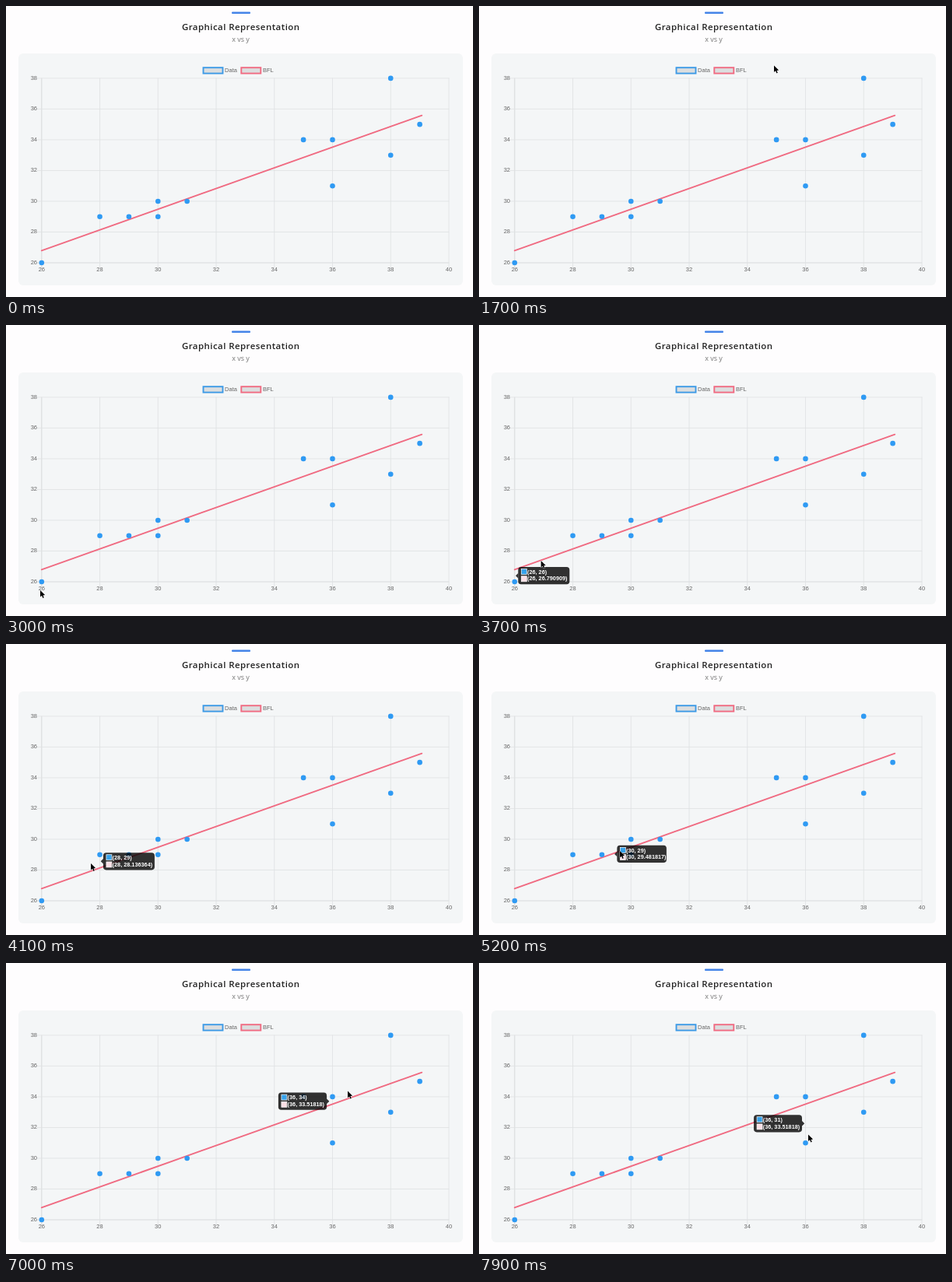
An HTML page for the animation above (8 s loop, 600 px wide and 374 px high).

```html
<!DOCTYPE html>
<html lang="en">
<head>
<meta charset="utf-8">
<title>Graphical Representation</title>
<style>
  html, body { margin: 0; width: 100%; height: 100%; overflow: hidden; background: #fefdfe; }
  svg { display: block; width: 600px; height: 374px; }
  text { font: 7.5px "Liberation Sans", Arial, sans-serif; fill: #666; }
  .title { font: 600 11.5px "Open Sans", "Noto Sans", sans-serif; letter-spacing: .43px; fill: #222; }
  .sub { font: 9px "Open Sans", "Noto Sans", sans-serif; fill: #777; }
  #tip text { font-size: 7.3px; font-weight: bold; fill: #fff; }
</style>
</head>
<body>
<svg viewBox="0 0 600 374">
  <rect x="290" y="7.5" width="24" height="2.4" rx="1" fill="#4484e8"/>
  <text class="title" x="301.7" y="31" text-anchor="middle">Graphical Representation</text>
  <text class="sub" x="301.5" y="46.3" text-anchor="middle">x vs y</text>
  <rect x="16" y="61" width="571" height="298" rx="6" fill="#f4f6f7"/>
  <g id="chart"></g>
  <g id="tip">
    <g fill="#000" fill-opacity=".8"><rect id="box" y="-11.1" height="22.2" rx="3.8"/><path id="caret"/></g>
    <g id="body">
      <rect x="4" y="-8.6" width="7" height="7" fill="#36a2eb" stroke="#fff" stroke-width=".7"/>
      <rect x="4" y=".6" width="7" height="7" fill="#fbdfe5" stroke="#fff" stroke-width=".7"/>
      <text id="row1" x="11.7" y="-2.4"></text>
      <text id="row2" x="11.7" y="6.2"></text>
    </g>
  </g>
  <path id="cursor" d="M0 0V8.6L2 6.8 3.4 9.9 4.8 9.3 3.5 6.4 6.1 6.1Z"
        fill="#000" stroke="#fff" stroke-width=".7" paint-order="stroke"/>
</svg>
<script>
const LOOP = 8000, STEP = 100, EASE_MS = 400, HOVER_LAG = 30;
const BLUE = '#2f9af3', PINK = '#f06b82';
const $ = id => document.getElementById(id);
const px = v => 45.8 + (v - 26) * 37.37;
const py = v => 330 - (v - 26) * 19.76;
const fit = v => 9.2999995 + v * 0.74 / 1.1;
const points = [[26, 26], [28, 29], [29, 29], [30, 29], [30, 30], [31, 30],
  [35, 34], [36, 34], [36, 31], [38, 33], [38, 38], [39, 35]];

function add(tag, attrs, text = '') {
  const el = document.createElementNS('http://www.w3.org/2000/svg', tag);
  for (const k in attrs) el.setAttribute(k, attrs[k]);
  el.textContent = text;
  $('chart').append(el);
}

function line(x1, y1, x2, y2, stroke, width) {
  add('line', { x1, y1, x2, y2, stroke, 'stroke-width': width, 'stroke-linecap': 'round' });
}

function legend(x, stroke, label) {
  add('rect', { x, y: 79.2, width: 25, height: 7.4, fill: '#dcdedf', stroke, 'stroke-width': 1.9 });
  add('text', { x: x + 27.6, y: 85.2 }, label);
}

function buildChart() {
  for (let v = 26; v <= 40; v += 2) {
    const grid = v === 26 ? '#d0d2d3' : '#dfe1e2';
    line(px(v), 92.9, px(v), 336, grid, 0.8);
    add('text', { x: px(v), y: 341.2, 'text-anchor': 'middle' }, v);
    if (v > 38) continue;
    line(40, py(v), 569, py(v), grid, 0.8);
    add('text', { x: 40, y: py(v) + 2, 'text-anchor': 'end' }, v);
  }
  legend(253.5, '#3d9ae6', 'Data');
  legend(302.3, PINK, 'BFL');
  line(px(26), py(fit(26)), px(39.07), py(fit(39.07)), PINK, 1.9);
  for (const [x, y] of points) add('circle', { cx: px(x), cy: py(y), r: 3.3, fill: BLUE });
}

// Pointer key positions: time, x, y
const path = [
  [1500, 590, 38], [1900, 168, 115], [2300, 71, 133], [2500, 8, 275], [2700, 8, 363],
  [3000, 44, 341], [3200, 43, 329], [4100, 109, 282], [4400, 109, 282], [4600, 66, 295],
  [4800, 140, 275], [5000, 155, 268], [5100, 155, 268], [5125, 181, 266], [5200, 181, 266],
  [6450, 205, 265], [6500, 221, 267], [6600, 375, 231], [7100, 455, 148], [7500, 424, 200],
  [7900, 423, 220.5]
];

const mix = (a, b, k) => a + (b - a) * k;
const easeOutQuart = k => 1 - (1 - Math.min(k, 1)) ** 4;

function pointerAt(t) {
  if (t < path[0][0]) return null;
  const i = path.findIndex(p => p[0] > t);
  if (i < 0) return path.at(-1).slice(1);
  const [a, b] = [path[i - 1], path[i]];
  const k = (t - a[0]) / (b[0] - a[0]);
  return [mix(a[1], b[1], k), mix(a[2], b[2], k)];
}

// Nearest point by column, then by height; none outside the plot
function hoveredAt(t) {
  const [x, y] = pointerAt(t) ?? [0, 0];
  if (x < 42 || x > 569 || y < 93 || y > 331) return null;
  const gap = p => Math.abs(px(p[0]) - x) + Math.abs(py(p[1]) - y) / 1e4;
  return points.reduce((best, p) => gap(p) < gap(best) ? p : best);
}

function findHovers() {
  const list = [];
  let last = null;
  for (let t = 0; t < LOOP; t += 4) {
    const point = hoveredAt(t - HOVER_LAG);
    if (point !== last) list.push({ start: t, point });
    last = point;
  }
  return list;
}

// Shortest decimal that identifies a 32-bit float
function floatLabel(v) {
  const f = Math.fround(v);
  let digits = 5;
  while (Math.fround(f.toPrecision(digits)) !== f) digits++;
  return f.toPrecision(digits);
}

const rowsFor = ([x, y]) => [`(${x}, ${y})`, `(${x}, ${floatLabel(fit(x))})`];

function tipGoal(point) {
  const [x, y] = point;
  const width = 5.1 + 4.06 * rowsFor(point)[1].length;
  return { x: px(x), y: (py(y) + py(fit(x))) / 2, width, alpha: 1, point };
}

// Each hover eases from wherever the previous one had reached
function tipAt(t) {
  let now = null;
  hovers.forEach(({ start, point }, i) => {
    if (start > t) return;
    const end = Math.min(t, hovers[i + 1]?.start ?? LOOP);
    const k = easeOutQuart((end - start) / EASE_MS);
    const goal = point ? tipGoal(point) : { ...now, alpha: 0 };
    const from = now ?? { ...goal, alpha: 0 };
    now = { point: goal.point };
    for (const key of ['x', 'y', 'width', 'alpha']) now[key] = mix(from[key], goal[key], k);
  });
  return now;
}

function drawTip(tip) {
  $('tip').setAttribute('opacity', tip ? tip.alpha : 0);
  if (!tip) return;
  [$('row1').textContent, $('row2').textContent] = rowsFor(tip.point);
  const side = tip.point[0] > 33 ? -1 : 1;
  const left = side > 0 ? 4.5 : -4.5 - tip.width;
  $('box').setAttribute('x', left);
  $('box').setAttribute('width', tip.width);
  $('caret').setAttribute('d', `M${side * 1.3} 0L${side * 4.5} -3.2V3.2Z`);
  $('body').setAttribute('transform', `translate(${left})`);
  $('tip').setAttribute('transform', `translate(${tip.x} ${tip.y})`);
}

function frame(now) {
  const t = Math.floor(now % LOOP / STEP) * STEP;
  const pointer = pointerAt(t);
  $('cursor').setAttribute('visibility', pointer ? 'visible' : 'hidden');
  if (pointer) $('cursor').setAttribute('transform', `translate(${pointer})`);
  drawTip(tipAt(t));
  requestAnimationFrame(frame);
}

const hovers = findHovers();
buildChart();
requestAnimationFrame(frame);
</script>
</body>
</html>
```
